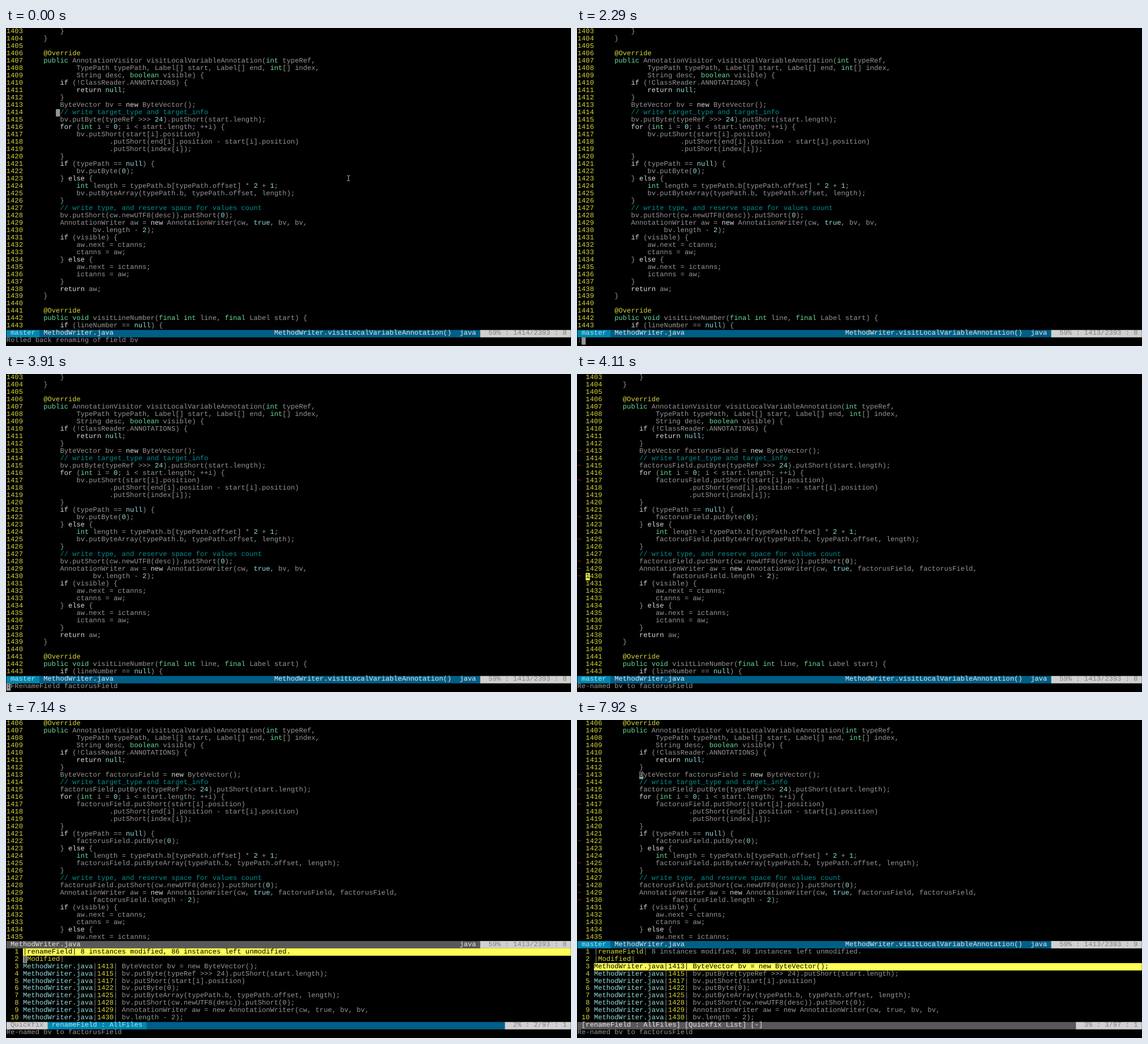
These frames come from a looping animation (998 by 561 pixels, 9.89 s). An HTML page with a canvas:

```html
<!DOCTYPE html>
<html lang="en">
<head>
<meta charset="utf-8">
<title>Renaming a field in the editor</title>
<style>
  html, body { margin: 0; width: 100%; height: 100%; overflow: hidden; background: #000; }
  canvas { display: block; }
</style>
</head>
<body>
<canvas id="screen" width="998" height="561"></canvas>
<script>
const LOOP = 9890, COLS = 137, ROWS = 43;
const CELL_W = 7.277, CELL_H = 12.986, LEFT = 0.8, TOP = 0.3, BASELINE = 8.7;

const C = {
  bg: '#000', text: '#969696', yellow: '#ffff55', number: '#d6d63a', type: '#66dc9a',
  keyword: '#dcdcdc', value: '#93dede', comment: '#008f8f', sign: '#c02020',
  blue: '#0087af', navy: '#005f87', pale: '#a8e4f8', light: '#d0d0d0',
  dim: '#808080', grey: '#585858', white: '#e6e6e6'
};

// "$" stands for the field that gets renamed.
const FIRST = 1403;
const source = `        }
    }

    @Override
    public AnnotationVisitor visitLocalVariableAnnotation(int typeRef,
            TypePath typePath, Label[] start, Label[] end, int[] index,
            String desc, boolean visible) {
        if (!ClassReader.ANNOTATIONS) {
            return null;
        }
        ByteVector $ = new ByteVector();
        // write target_type and target_info
        $.putByte(typeRef >>> 24).putShort(start.length);
        for (int i = 0; i < start.length; ++i) {
            $.putShort(start[i].position)
                    .putShort(end[i].position - start[i].position)
                    .putShort(index[i]);
        }
        if (typePath == null) {
            $.putByte(0);
        } else {
            int length = typePath.b[typePath.offset] * 2 + 1;
            $.putByteArray(typePath.b, typePath.offset, length);
        }
        // write type, and reserve space for values count
        $.putShort(cw.newUTF8(desc)).putShort(0);
        AnnotationWriter aw = new AnnotationWriter(cw, true, $, $,
                $.length - 2);
        if (visible) {
            aw.next = ctanns;
            ctanns = aw;
        } else {
            aw.next = ictanns;
            ictanns = aw;
        }
        return aw;
    }

    @Override
    public void visitLineNumber(final int line, final Label start) {
        if (lineNumber == null) {`.split('\n');

const rules = [
  [/\/\/.*/g, C.comment],
  [/@\w+/g, C.number],
  [/\b(public|final|void|int|boolean)\b/g, C.type],
  [/\b(if|else|for|return|new)\b/g, C.keyword],
  [/\b(null|true|\d+)\b/g, C.value]
];

const FILE = 'MethodWriter.java';
const hits = source
  .map((code, i) => ({ line: FIRST + i, code }))
  .filter(h => h.code.includes('$'))
  .map(h => [FILE, String(h.line), ' ' + h.code.trim().replaceAll('$', 'bv')]);
const quickfix = [
  ['', 'renameField', ' 8 instances modified, 86 instances left unmodified.'],
  ['', 'Modified', ''],
  ...hits
];

// Each step changes part of the editor state.
const steps = [
  [0, { name: 'bv', signs: false, split: false, focus: 'code', line: 1414, col: 8,
        item: 1, picked: 1, cursor: [11, 12], pointer: true,
        message: 'Rolled back renaming of field bv' }],
  [80, { cursor: [10, 12], pointer: false }],
  [140, { line: 1413 }],
  [2290, { message: ':', cursor: [42, 1] }],
  [2560, { message: ':F', cursor: [42, 2] }],
  [2750, { message: ':FRollback', cursor: [42, 10] }],
  [3170, { message: ':FRenameField factorusField', cursor: [42, 27] }],
  [3660, { cursor: null }],
  [3910, { cursor: [42, 0] }],
  [4110, { name: 'factorusField', signs: true, cursor: [27, 2],
           message: 'Re-named bv to factorusField' }],
  [4340, { split: true, signs: false, focus: 'list', cursor: [31, 4] }],
  [7140, { item: 2, cursor: [32, 4] }],
  [7420, { item: 3, cursor: [33, 4] }],
  [7920, { focus: 'code', signs: true, picked: 3, col: 9, cursor: [7, 15] }]
];
let last = {};
const scenes = steps.map(([at, change]) => ({ at, state: last = { ...last, ...change } }));

const ctx = document.getElementById('screen').getContext('2d');
let grid;

function put(row, col, text, fg, bg) {
  for (const ch of text) {
    const cell = grid[row][col++];
    if (!cell) return;
    cell.ch = ch;
    cell.fg = fg;
    if (bg) cell.bg = bg;
  }
}

const bar = (row, bg) => put(row, 0, ' '.repeat(COLS), C.white, bg);
const putRight = (row, text) => put(row, COLS - text.length, text, C.dim, C.light);

function putCode(row, col, code) {
  put(row, col, code, C.text);
  for (const [pattern, color] of rules) {
    for (const m of code.matchAll(pattern)) put(row, col + m.index, m[0], color);
    if (color === C.comment && code.includes('//')) return;
  }
}

function codePane(s) {
  const rows = s.split ? 30 : 41;
  const skip = s.split ? 3 : 0;
  const shift = s.signs ? 2 : 0;
  for (let r = 0; r < rows; r++) {
    const raw = source[skip + r];
    if (s.signs && raw.includes('$')) put(r, 0, '~', C.sign);
    put(r, shift, String(FIRST + skip + r), C.number);
    putCode(r, shift + 5, raw.replaceAll('$', s.name));
  }
  const active = s.focus === 'code';
  bar(rows, active ? C.navy : C.grey);
  if (active) {
    put(rows, 0, ' master ', C.pale, C.blue);
    put(rows, 9, FILE, C.white);
    put(rows, 65, 'MethodWriter.visitLocalVariableAnnotation()', C.white);
  } else {
    put(rows, 1, FILE, C.white);
  }
  put(rows, 110, 'java', C.white);
  putRight(rows, `  59% : ${s.line}/2393 : ${s.col} `);
}

function listPane(s) {
  quickfix.forEach(([file, tag, rest], i) => {
    const row = 31 + i;
    const end = 4 + file.length;
    put(row, 0, String(i + 1).padStart(3), C.number);
    put(row, 4, `${file}|${tag}|${rest}`, C.text);
    put(row, 4, file, C.value);
    put(row, end + 1, tag, C.number);
    if (i + 1 === s.picked) {
      for (const cell of grid[row].slice(4)) Object.assign(cell, { fg: C.bg, bg: C.yellow });
    }
  });
  if (s.focus === 'list') {
    bar(41, C.navy);
    put(41, 0, ' Quickfix ', C.dim, C.light);
    put(41, 10, ' renameField : AllFiles ', C.pale, C.blue);
  } else {
    bar(41, C.grey);
    put(41, 1, '[renameField : AllFiles] [Quickfix List] [-]', C.white);
  }
  putRight(41, `  ${s.item}% : ${s.item}/97 : 1 `);
}

function drawPointer() {
  ctx.fillStyle = '#c8c8c8';
  ctx.fillRect(604.5, 261, 1, 8);
  for (const y of [260, 269]) {
    ctx.fillRect(602.5, y, 2, 1);
    ctx.fillRect(605.5, y, 2, 1);
  }
}

const x = col => LEFT + col * CELL_W;
const y = row => TOP + row * CELL_H;

// Fills runs of equal background; a touching run overlaps by a pixel to hide the seam.
function fillRow(cells, r) {
  for (let c = 0, end; c < COLS; c = end) {
    const bg = cells[c].bg;
    for (end = c + 1; end < COLS && cells[end].bg === bg;) end++;
    if (bg === C.bg) continue;
    const overlap = end < COLS && cells[end].bg !== C.bg ? 1 : 0;
    ctx.fillStyle = bg;
    ctx.fillRect(x(c), y(r), x(end) - x(c) + overlap, CELL_H);
  }
}

function draw(s) {
  grid = Array.from({ length: ROWS }, () =>
    Array.from({ length: COLS }, () => ({ ch: ' ', fg: C.text, bg: C.bg })));
  codePane(s);
  if (s.split) listPane(s);
  put(42, 0, s.message, C.text);
  if (s.cursor) {
    const cell = grid[s.cursor[0]][s.cursor[1]];
    const fg = cell.fg === C.number ? C.yellow : cell.fg;
    [cell.fg, cell.bg] = [cell.bg, fg];
  }

  ctx.fillStyle = C.bg;
  ctx.fillRect(0, 0, 998, 561);
  grid.forEach(fillRow);
  ctx.font = '12.126px "Liberation Mono", monospace';
  ctx.textRendering = 'geometricPrecision';
  grid.forEach((cells, r) => cells.forEach((cell, c) => {
    if (cell.ch === ' ') return;
    ctx.fillStyle = cell.fg;
    ctx.fillText(cell.ch, x(c), y(r) + BASELINE);
  }));
  if (s.pointer) drawPointer();
}

let shown = null;
function tick() {
  const t = performance.now() % LOOP;
  const scene = scenes.findLast(item => item.at <= t);
  if (scene !== shown) draw((shown = scene).state);
  requestAnimationFrame(tick);
}
tick();
</script>
</body>
</html>
```
